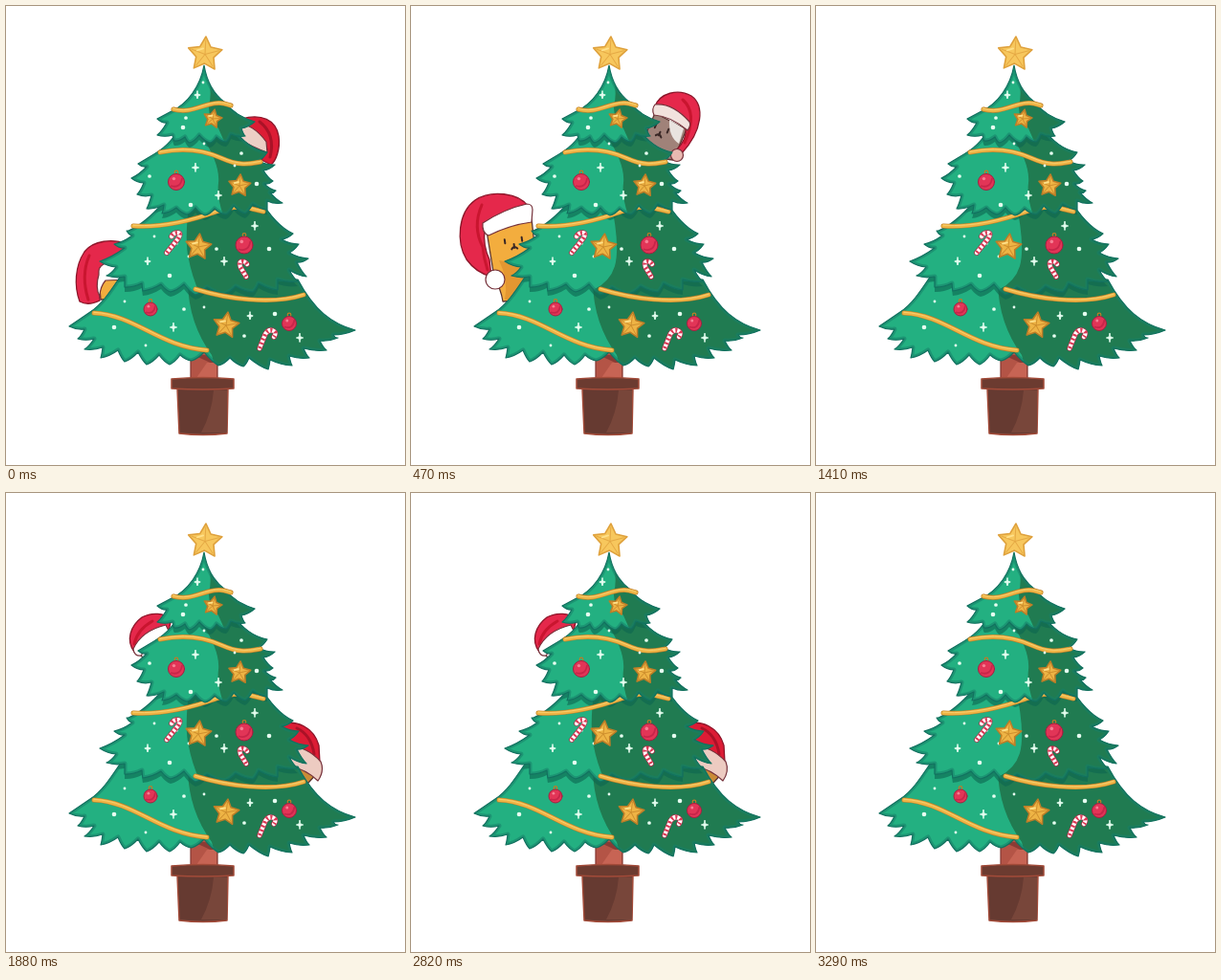
Recreate the animation shown at these times as an HTML page. Size 417x480 px, loop 3.76 s.

```html
<!DOCTYPE html>
<html lang="en">
<head>
<meta charset="utf-8">
<title>Peeking Christmas tree</title>
<style>
html, body { margin: 0; width: 100%; height: 100%; overflow: hidden; background: #fff; }
svg { display: block; width: 100%; height: 100%; }
</style>
</head>
<body>
<svg id="stage" viewBox="0 0 417 480" stroke-linejoin="round" stroke-linecap="round"></svg>
<script>
const STEP = 470;
const RED = '#e5284b', DEEP = '#c9152f', LINE = '#8c1529', GOLD = '#eeb445', OCHRE = '#bd7d27';
const LIGHT = '#23b081', DARK = '#207b51', EDGE = '#12705f';

const path = (d, fill, stroke = 'none', w = 1, more = '') =>
  `<path d="${d}" fill="${fill}" stroke="${stroke}" stroke-width="${w}" ${more}/>`;
const dot = (x, y, r, fill, more = '') =>
  `<circle cx="${x}" cy="${y}" r="${r}" fill="${fill}" ${more}/>`;
const group = (body, more = '') => `<g ${more}>${body}</g>`;
const pairs = s => s.split(' ').map(p => p.split(',').map(Number));

// Drooping needle edge through alternating tips and notches
function needles(list) {
  let last;
  return pairs(list).map(([x, y]) => {
    const seg = last ? `Q${(last[0] + x) / 2} ${(last[1] + y) / 2 + 2.5} ${x} ${y}` : `L${x} ${y}`;
    last = [x, y];
    return seg;
  }).join('');
}

function starPath(r, inner, from = 0, count = 10) {
  let d = '';
  for (let i = 0; i < count; i++) {
    const a = (from + i) * Math.PI / 5 - Math.PI / 2, q = (from + i) % 2 ? inner : r;
    d += `${i ? 'L' : 'M'}${(q * Math.cos(a)).toFixed(2)} ${(q * Math.sin(a)).toFixed(2)}`;
  }
  return d + 'Z';
}

function star(x, y, r, turn, pale) {
  let body = path(starPath(r, r * .52), pale ? '#f7c75d' : GOLD, pale ? '#dfa13c' : OCHRE, 1.6);
  for (let i = 0; i < 10; i += 2) {
    const a = i * Math.PI / 5 - Math.PI / 2;
    body += path(`M0 0L${r * .8 * Math.cos(a)} ${r * .8 * Math.sin(a)}`, 'none', pale ? '#e5a945' : '#cf902f', 1);
  }
  body += path(`M${-r * .45} ${-r * .2}L${-r * .12} ${-r * .32}`, 'none', '#ffe08a', 1.8);
  return group(body, `transform="translate(${x} ${y}) rotate(${turn})"`);
}

const bauble = (x, y, r) =>
  dot(x, y - r - 1.5, 1.8, 'none', `stroke="${OCHRE}" stroke-width="1.2"`) +
  dot(x, y, r, '#e23557', 'stroke="#a51f41" stroke-width="1"') +
  path(`M${x - r * .6} ${y + r * .5}Q${x + r * .5} ${y + r * .8} ${x + r * .7} ${y - r * .4}`, 'none', '#c72549', 1.8) +
  dot(x - r * .3, y - r * .4, r * .2, '#f57f93');

const cane = d => path(d, 'none', '#a6324a', 5.6) + path(d, 'none', '#fff', 4.2) +
  path(d, 'none', '#dc3552', 4.2, 'stroke-dasharray="2 2.6" style="stroke-linecap:butt"');

const twinkle = (x, y, r) => path(
  `M${x} ${y - r}Q${x} ${y} ${x + r * .8} ${y}Q${x} ${y} ${x} ${y + r}Q${x} ${y} ${x - r * .8} ${y}Q${x} ${y} ${x} ${y - r}Z`,
  '#e6fff1', '#e6fff1', 1);

const garland = d => path(d, 'none', OCHRE, 5) + path(d, 'none', GOLD, 3.8) +
  path(d, 'none', '#f8cf70', 1, 'transform="translate(0 -.7)"');

const tiers = [
  ['M120 282C108 300 100 312 88 320',
   '66,335 82,338 75,348 92,348 82,359 101,357 99,368 117,360 124,372 138,362 147,375 160,365 171,375 182,365 194,371 207,362 222,376 234,368 248,377 254,368 274,380 276,370 299,376 296,366 317,368 311,358 335,360 328,350 347,347 342,344 365,339',
   'C340 332 322 318 305 286Z'],
  ['M165 205C150 222 140 230 128 235',
   '126,235 132,240 113,249 124,253 98,267 115,273 105,282 124,283 124,294 142,290 143,298 162,291 172,299 186,291 198,302 210,294 228,301 240,293 258,299 264,290 284,297 284,286 305,288 296,276 314,283 304,268 316,264 296,258 306,249 288,244 300,238',
   'Q282 230 264 200Z'],
  ['M180 130C170 146 160 152 148 159',
   '138,165 147,168 131,180 144,185 137,197 152,198 147,212 165,208 163,217 178,211 189,218 198,211 208,219 218,212 230,218 238,209 250,217 258,207 273,213 273,204 289,206 276,195 282,193 270,186 279,183 269,172 281,166 264,162 273,153',
   'Q252 149 238 128Z'],
  ['M207 62C203 84 190 102 173 110',
   '158,118 168,122 158,135 174,135 176,141 187,137 192,143 202,135 213,143 220,137 230,142 235,134 250,136 246,128 260,121',
   'Q240 115 229 101C217 92 210 80 207 62Z']
].map(([head, tips, tail]) => head + needles(tips) + tail);

const shades = [
  'M190 290Q191 332 215 365L222 390H380V280Z',
  'M208 200Q219 250 213 272Q208 288 192 296L200 310H330V200Z',
  'M204 135Q224 165 222 185Q220 200 228 222H300V135Z',
  'M207 60Q217 87 212 104Q211 116 222 128L230 146H270V60Z'
];
const shadeLow = 'M192 200Q186 245 191 265Q194 282 204 305H330V200Z';

function tier(i) {
  const clip = `clip-path="url(#c${i})"`;
  const shade = i === 1
    ? path(shades[1], DARK, 'none', 1, 'id="full"') + path(shadeLow, DARK, 'none', 1, 'id="wide"')
    : path(shades[i], DARK);
  const cast = i < 3 ? path(tiers[i + 1], '#0d6750', 'none', 1, 'transform="translate(0 5)" opacity=".6"') : '';
  const rim = path(tiers[i], 'none', '#168069', 5, 'opacity=".55"');
  return path(tiers[i], LIGHT) + group(shade + cast + rim, clip) + path(tiers[i], 'none', EDGE, 1.2);
}

const pot =
  path('M193 358H221V392H193Z', '#b45446', '#84362f', 1.2) +
  path('M194 364L220 376V366Z', '#893c35') + path('M199 389L210 373H220V389Z', '#c76454') +
  path('M179 400H232L231 447Q206 450 181 447Z', '#663a31', '#a34b39', 1.5) +
  path('M217 402H231V446H204Q215 426 217 402Z', '#78463a') +
  path('M173 390Q206 387 238 390V400Q206 402 173 400Z', '#6c3b30', '#a34b39', 1.5);

const sparks = pairs('200,93 198,169 222,198 148,267 175,336 228,267 255,324 307,347 260,230')
  .map(([x, y], i) => twinkle(x, y, i % 3 ? 4.5 : 4)).join('');
const snow = pairs('206,80 188,117 185,127 207,144 150,178 193,208 239,167 246,154 262,186 155,241 178,248 171,282 191,262 220,254 275,254 124,309 186,317 113,336 146,355 249,345 281,322 207,315')
  .map(([x, y], i) => dot(x, y, 1.4 + i % 3 * .45, '#e6fff1')).join('');

const tree = pot + tier(0) +
  garland('M92 321C135 323 160 356 210 360') +
  tier(1) +
  garland('M198 296C230 306 278 313 311 302') +
  garland('M133 230C165 232 195 224 220 215S255 212 269 215') +
  tier(2) +
  garland('M161 153C185 148 205 150 225 159S255 165 266 163') +
  tier(3) +
  garland('M175 108C190 112 200 106 212 103S228 102 235 104') +
  snow + sparks +
  bauble(178, 184, 8.5) + bauble(249, 250, 9) + bauble(151, 317, 7) + bauble(296, 332, 7.5) +
  cane('M168 258L180 243Q184 237 179 237Q175 237 173 241') +
  cane('M251 283L245 273Q243 267 247 267Q250 267 252 270') +
  cane('M265 358L271 343Q275 337 280 340Q283 342 280 346') +
  star(216, 118, 10, 12) + star(244, 188, 12, 5) + star(201, 252, 14, 6) + star(230, 334, 14, 8) +
  star(208, 50.5, 18.5, 3, true);

const hat = (d, fill = RED) => path(d, fill, LINE, 1.3);
const brim = (d, fill = '#fff') => path(d, fill, '#76323b', 1.2);
const skin = (d, fill) => path(d, fill, '#5b3531', 1.3);
const face = (x, y, gap, turn) => group(
  path(`M${-gap} -2V2M${gap} -2V2M0 4V8M-3 9Q0 5 3 9`, 'none', '#392725', 2),
  `transform="translate(${x} ${y}) rotate(${turn})"`);
const pom = (x, y, r, fill = '#fff') => dot(x, y, r, fill, 'stroke="#76323b" stroke-width="1.2"');

const hidingA =
  skin('M97 285L125 276L128 306L99 307Z', '#f2ad3e') +
  hat('M126 249C112 243 91 245 82 257C72 272 71 293 77 309Q86 314 98 308L97 286L122 265Z') +
  path('M87 261Q78 282 86 307', 'none', DEEP, 3) +
  brim('M97 281Q96 273 102 270L128 264V286L104 287Q98 294 98 304Q93 294 97 281Z') +
  skin('M240 120L275 150L266 163L240 150Z', '#b9988c') +
  hat('M246 118C267 112 282 119 285 136C287 150 282 162 277 166L267 161L273 150Z', '#dc1c35') +
  path('M265 121Q282 134 276 158', 'none', '#aa1227', 3) +
  brim('M242 123Q258 123 272 142L273 153Q258 148 242 138Z', '#eccfc5');

const peekingA =
  skin('M79 235L126 222L135 306L96 309Q94 296 87 284Z', '#f3ad3e') +
  path('M92 266Q102 286 98 307H120V272Z', '#e49731') +
  face(107, 245, 9, -8) +
  hat('M123 210C113 195 83 192 67 203C49 216 47 247 58 265Q68 279 84 283L82 265Q75 251 77 234Z') +
  path('M74 208Q64 231 75 252Q76 264 80 276', 'none', DEEP, 3) +
  brim('M75 227Q98 212 121 207Q127 207 127 213L126 226Q103 229 81 240Q74 237 75 227Z') +
  pom(88, 286, 10) +
  skin('M255 112L288 129L274 161Q256 160 242 142Z', '#a08279') +
  path('M270 119L285 128L280 144Q269 137 270 119Z', '#e9e3df') +
  face(262, 128, 7, 22) +
  hat('M255 105C260 91 279 86 293 94C307 104 305 130 283 154L277 151Q289 139 287 127Z') +
  path('M284 98Q300 112 286 143', 'none', DEEP, 3) +
  brim('M255 103Q273 101 291 121Q293 125 289 130Q271 115 254 114Q251 108 255 103Z', '#f2e2dd') +
  pom(278, 156, 6.5, '#e9b9b1');

const hidingB =
  skin('M137 166L166 148L176 178L145 174Z', '#e6e8ea') +
  hat('M134 166C125 154 130 139 142 130C153 124 165 126 173 131L170 144Z') +
  path('M134 158Q137 143 153 134', 'none', DEEP, 3) +
  brim('M133 163Q142 144 167 138L173 150Q151 155 141 170Q134 171 133 163Z') +
  skin('M295 264L328 290L316 303L292 291Z', '#c98b37') +
  hat('M284 243C304 235 322 246 327 264L328 282L298 268Z', '#dc1c35') +
  path('M304 246Q319 253 322 273', 'none', '#aa1227', 3) +
  brim('M297 265Q314 265 329 281Q333 291 326 301Q314 289 295 285Z', '#edcbc1');

const peekingB =
  skin('M122 146L162 131L176 177L141 172Z', '#e5e8ea') +
  path('M156 136L168 132L176 177L161 171Z', '#bec5ca') +
  face(142, 149, 6, -20) +
  hat('M117 146C109 139 107 124 114 116C123 106 145 105 157 113Q168 120 170 132L160 129Z') +
  path('M119 133Q126 117 144 113', 'none', DEEP, 3) +
  brim('M116 145Q134 127 161 121Q168 124 166 134Q140 137 123 153Q115 153 116 145Z') +
  skin('M300 246L353 267L326 320L294 298Z', '#dc942f') +
  path('M344 270L351 272L329 320L322 316Z', '#5b382d') +
  path('M329 264L337 267L331 275ZM311 287L322 292L314 299Z', '#a96629') +
  face(321, 267, 8, 20) +
  hat('M298 243C302 225 319 213 337 216C356 219 365 237 364 264L351 268Z', '#dd203b') +
  path('M338 219Q358 232 357 260', 'none', '#ae142b', 3) +
  brim('M299 238Q334 238 364 263Q367 270 358 277Q329 251 298 253Q292 247 299 238Z', '#f7e9e4') +
  path('M321 222L308 236M334 224L319 240', 'none', '#f05a6a', 2);

const poses = { hidingA, peekingA, hidingB, peekingB };
const order = ['hidingA', 'peekingA', 'hidingA', '', 'hidingB', 'peekingB', 'hidingB', ''];
const stage = document.getElementById('stage');
stage.innerHTML =
  `<defs>${tiers.map((d, i) => `<clipPath id="c${i}"><path d="${d}"/></clipPath>`).join('')}</defs>` +
  Object.entries(poses).map(([id, body]) => group(body, `id="${id}"`)).join('') + tree;

const get = id => document.getElementById(id);
const show = (id, on) => { get(id).style.display = on ? '' : 'none'; };

function draw(ms) {
  const pose = order[Math.floor(ms / STEP) % order.length];
  for (const id in poses) show(id, id === pose);
  const hiding = pose.startsWith('hiding');
  show('wide', hiding);
  show('full', !hiding);
}

const start = performance.now();
function tick() {
  draw(performance.now() - start);
  requestAnimationFrame(tick);
}
draw(0);
requestAnimationFrame(tick);
</script>
</body>
</html>
```
